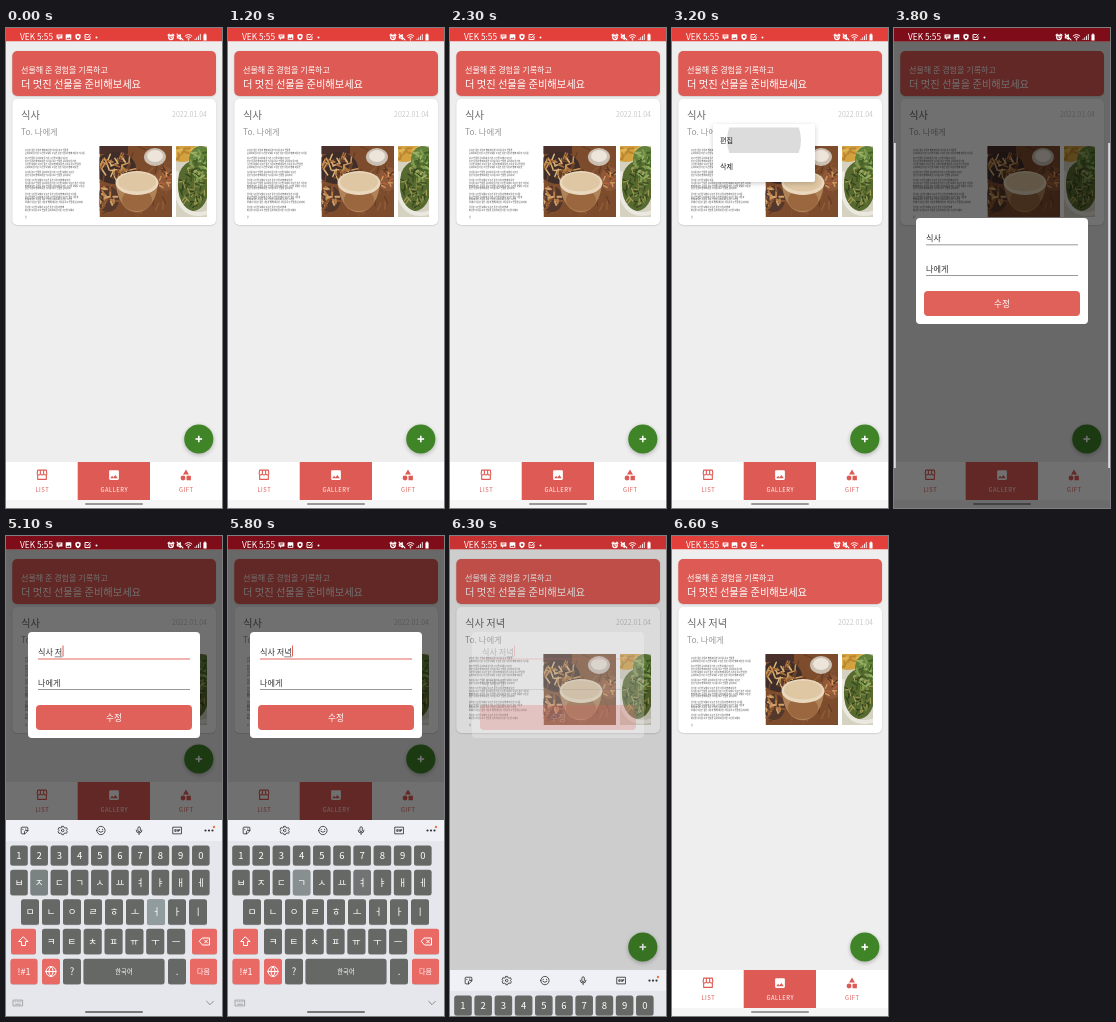
Animation, 216 px wide and 480 px high, one loop 7300 ms. Source, as an HTML page with a canvas:

```html
<!DOCTYPE html>
<html lang="ko">
<head>
<meta charset="utf-8">
<style>
  html, body { margin: 0; width: 100%; height: 100%; overflow: hidden; background: #eee; }
  canvas { display: block; width: 100vw; height: 100vh; }
</style>
</head>
<body>
<canvas></canvas>
<script>
const W = 216, H = 480, LOOP = 7300, STEP = 100;
const RED = '#de5b55', KEY = '#656865', KEY_RED = '#e96964';
const FONT = '"Noto Sans CJK KR", "Noto Sans CJK", "Noto Sans", sans-serif';
const canvas = document.querySelector('canvas');
const ctx = canvas.getContext('2d');

// ---- helpers ----
const ramp = (t, a, b) => Math.min(1, Math.max(0, (t - a) / (b - a)));

function box(x, y, w, h, r, color, shadow = 0) {
  ctx.save();
  if (shadow) {
    ctx.shadowColor = 'rgba(0,0,0,.2)';
    ctx.shadowBlur = shadow * scale;
    ctx.shadowOffsetY = shadow * scale * .3;
  }
  ctx.fillStyle = color;
  ctx.beginPath();
  ctx.roundRect(x, y, w, h, r);
  ctx.fill();
  ctx.restore();
}

function oval(x, y, rx, ry, color) {
  ctx.fillStyle = color;
  ctx.beginPath();
  ctx.ellipse(x, y, rx, ry, 0, 0, 7);
  ctx.fill();
}

function text(str, x, y, size, color, { align = 'left', weight = 400, spacing = 0 } = {}) {
  ctx.font = `${weight} ${size}px ${FONT}`;
  ctx.letterSpacing = spacing + 'px';
  ctx.textAlign = align;
  ctx.fillStyle = color;
  ctx.fillText(str, x, y);
  ctx.letterSpacing = '0px';
}

// Icons live on a 24-unit grid; a line width draws them as outlines.
function icon(path, x, y, size, color, line = 0) {
  ctx.save();
  ctx.translate(x - size / 2, y - size / 2);
  ctx.scale(size / 24, size / 24);
  ctx.fillStyle = ctx.strokeStyle = color;
  ctx.lineWidth = line;
  ctx.lineJoin = ctx.lineCap = 'round';
  const shape = new Path2D(path);
  line ? ctx.stroke(shape) : ctx.fill(shape, 'evenodd');
  ctx.restore();
}

const circle = (x, y, r) => `M${x - r} ${y}a${r} ${r} 0 1 0 ${2 * r} 0a${r} ${r} 0 1 0 ${-2 * r} 0z`;

const ICON = {
  store: 'M4 3h16l1 7q-3 4-6 0q-3 4-6 0q-3 4-6 0zM4 12v8h16v-8M9 3v7M15 3v7',
  image: 'M21 19V5a2 2 0 0 0-2-2H5a2 2 0 0 0-2 2v14a2 2 0 0 0 2 2h14a2 2 0 0 0 2-2zM8.5 13.5l2.5 3 3.5-4.5 4.5 6H5z',
  category: 'M12 2l5.5 9h-11zM13 13.5h8v8h-8z' + circle(6.5, 17.5, 4.5),
  chat: 'M2 3h20v14H12l-5 5v-5H2zM6 7v2h12V7zM6 11v2h9v-2z',
  shield: 'M12 1l9 3v8c0 6-5 9-9 11c-4-2-9-5-9-11V4z' + circle(12, 11, 4),
  check: 'M20 11v9H4V4h11M8 11l4 4 9-11',
  alarm: circle(12, 13, 8) + 'M12 8v5l3 2M2 6l4-4M22 6l-4-4',
  mute: 'M3 9h4l6-5v16l-6-5H3zM2 2l20 20',
  wifi: 'M2 9q10-9 20 0M6 13q6-5 12 0M10 17q2-2 4 0M12 20v1',
  signal: 'M2 22v-4h3v4zM8 22v-9h3v9zM14 22V8h3v14zM20 22V2h3v20z',
  battery: 'M7 4h3V1h4v3h3v19H7z',
  sticker: 'M20 12V6a2 2 0 0 0-2-2H6a2 2 0 0 0-2 2v12a2 2 0 0 0 2 2h6zM12 20v-6l2-2h6M8 9v1M15 8v1',
  gear: circle(12, 12, 3) + 'M10 2h4l1 3 3 1 3-1 2 4-2 3 2 3-2 4-3-1-3 1-1 3h-4l-1-3-3-1-3 1-2-4 2-3-2-3 2-4 3 1 3-1z',
  smile: circle(12, 12, 10) + 'M8 9v1M16 9v1M7 14q5 5 10 0',
  mic: 'M9 6a3 3 0 0 1 6 0v6a3 3 0 0 1-6 0zM5 11a7 7 0 0 0 14 0M12 18v4',
  gif: 'M2 4h20v16H2zM9 10H6v4h3v-2M12 10v4M18 10h-3v4M15 12h2',
  shift: 'M12 3l9 9h-5v8H8v-8H3z',
  erase: 'M8 5h14v14H8l-6-7zM12 9l6 6M18 9l-6 6',
  globe: circle(12, 12, 10) + 'M2 12h20M12 2q-9 10 0 20M12 2q9 10 0 20',
  board: 'M1 5h22v14H1zM5 9h1M10 9h1M14 9h1M18 9h1M6 15h12',
  down: 'M4 8l8 8 8-8'
};

let seed;
const rand = () => (seed = (seed * 16807) % 2147483647) / 2147483647;

function strokes(count, x, y, rx, ry, length, width, colors) {
  ctx.lineWidth = width;
  ctx.lineCap = 'round';
  for (let i = 0; i < count; i++) {
    const a = rand() * 6.28, d = Math.sqrt(rand()), turn = rand() * 6.28;
    const px = x + rx * d * Math.cos(a), py = y + ry * d * Math.sin(a);
    ctx.strokeStyle = colors[i % colors.length];
    ctx.beginPath();
    ctx.moveTo(px, py);
    ctx.lineTo(px + length * Math.cos(turn), py + length * Math.sin(turn));
    ctx.stroke();
  }
}

function clipped(x, y, w, h, draw) {
  ctx.save();
  ctx.beginPath();
  ctx.rect(x, y, w, h);
  ctx.clip();
  draw();
  ctx.restore();
}

// ---- main screen ----
function letter() {
  const words = '오늘은 좋은 사람과 함께 따뜻한 식사를 하고 선물을 준비하며 즐거운 시간을 보냈다'.split(' ');
  let y = 122.8, word = 0;
  [[43, 56], [43, 48, 55, 50], [49, 46], [47, 62, 60, 44], [51, 50, 44, 53], [40, 50]].forEach(group => {
    for (const width of group) {
      let line = '';
      ctx.font = `500 2.1px ${FONT}`;
      while (ctx.measureText(line).width < width - 2) line += words[word++ % words.length] + ' ';
      text(line.trim(), 19, y, 2.1, '#333', { weight: 500 });
      y += 2.9;
    }
    y += 2.25;
  });
  text('끝', 19, 190, 2.1, '#555');
}

function dinnerPhoto() {
  seed = 71;
  box(93.5, 118, 72.5, 71, 0, '#7d4c2d');
  strokes(50, 130, 153, 40, 38, 8, 1.2, ['#94603a', '#643b25', '#85532f']);
  box(93, 118, 29, 8, 0, '#4a302a');
  oval(109, 140, 21, 16, '#3f2d29');
  strokes(50, 108, 139, 17, 11, 6, 1.5, ['#c99456', '#a96d37', '#ddb57a', '#6e4429']);
  oval(102, 171, 11, 13, '#54382b');
  strokes(22, 101, 171, 9, 11, 4, 2, ['#b97d47', '#8a5632', '#d2a26a']);
  oval(149, 129, 11, 9, '#cbbfb2');
  oval(149, 128, 8, 6, '#ede5da');
  oval(160, 151, 10, 12, '#8d5938');
  strokes(18, 159, 150, 8, 10, 4, 1.5, ['#cd955b', '#5b3722', '#b0623a']);
  // Glass seen from above: amber body under pale foam.
  ctx.fillStyle = '#b08258';
  ctx.beginPath();
  ctx.moveTo(110, 155);
  ctx.bezierCurveTo(112, 194, 149, 194, 152, 155);
  ctx.fill();
  oval(131, 172, 15, 11, '#9a673f');
  oval(131, 155, 21.5, 12, '#e9d8be');
  oval(131, 154, 19, 9.5, '#dfc7a3');
}

function saladPhoto() {
  seed = 29;
  box(170, 118, 31, 71, 0, '#d5d2c2');
  oval(176, 122, 15, 12, '#d3a23f');
  strokes(14, 176, 122, 10, 8, 5, 2, ['#e0b656', '#b98532']);
  oval(195, 132, 12, 14, '#62813a');
  oval(187, 158, 16, 25, '#56692f');
  strokes(36, 192, 137, 9, 16, 5, 2, ['#43602a', '#7f9c4f', '#98ae62']);
  strokes(60, 187, 160, 12, 20, 5, 1.2, ['#38491f', '#7d8542', '#2f3f1c', '#a39a55']);
  ctx.strokeStyle = '#ebe9df';
  ctx.lineWidth = 4;
  ctx.beginPath();
  ctx.moveTo(171, 145);
  ctx.bezierCurveTo(166, 175, 180, 192, 203, 184);
  ctx.stroke();
}

function fab(y) {
  ctx.save();
  ctx.shadowColor = 'rgba(0,0,0,.25)';
  ctx.shadowBlur = 4 * scale;
  ctx.shadowOffsetY = 1.5 * scale;
  oval(192.8, y, 14.6, 14.6, '#408428');
  ctx.restore();
  box(189.5, y - .8, 6.6, 1.6, 0, '#fff');
  box(192, y - 3.3, 1.6, 6.6, 0, '#fff');
}

function tabs(y) {
  box(0, y, W, 38, 0, '#fff');
  box(71.7, y, 72.3, 38, 0, RED);
  icon(ICON.store, 36, y + 13, 13, RED, 2);
  icon(ICON.image, 108, y + 13, 13, '#fff');
  icon(ICON.category, 180, y + 13, 13, RED);
  ['LIST', 'GALLERY', 'GIFT'].forEach((label, i) =>
    text(label, 36.3 + 72 * i, y + 30, 5.8, i === 1 ? '#fff' : RED, { align: 'center', spacing: .5 }));
}

function gallery(title, bottom) {
  box(0, 0, W, H, 0, '#eee');
  box(6.3, 23, 203.7, 45, 5, RED, 1.5);
  text('선물해 준 경험을 기록하고', 15, 44.7, 8.05, '#fff');
  text('더 멋진 선물을 준비해보세요', 15, 60, 10.25, '#fff');
  box(6.3, 71, 203.7, 126, 5, '#fff', 1.5);
  text(title, 15, 90.7, 10.3, '#666');
  text('2022.01.04', 201, 89, 7, '#c8c8c8', { align: 'right' });
  text('To. 나에게', 15, 107, 8.4, '#999');
  letter();
  clipped(93.5, 118, 72.5, 71, dinnerPhoto);
  clipped(170, 118, 31, 71, saladPhoto);
  fab(bottom - 61);
  tabs(bottom - 38);
  box(0, bottom, W, H - bottom, 0, '#f5f5f5');
  box(79, 475, 58, 2, 1, '#999');
}

function statusBar(dim) {
  box(0, 0, W, 13.3, 0, '#e33f3b');
  ctx.globalAlpha = dim;
  box(0, 0, W, 13.3, 0, '#7e0c19');
  ctx.globalAlpha = 1;
  text('VEK 5:55', 14, 12.2, 8.3, '#fff');
  icon(ICON.chat, 53.5, 9, 7, '#fff');
  icon(ICON.image, 62.5, 9, 7.5, '#fff');
  icon(ICON.shield, 72, 9, 7, '#fff');
  icon(ICON.check, 81.5, 9, 7.5, '#fff', 3);
  oval(90.5, 9.5, 1, 1, '#fff');
  icon(ICON.alarm, 165, 9, 7, '#fff', 4);
  icon(ICON.mute, 174, 9, 7, '#fff', 4);
  icon(ICON.wifi, 182.5, 9, 8, '#fff', 3);
  icon(ICON.signal, 191.5, 9, 7, '#fff');
  icon(ICON.battery, 199, 9, 7.5, '#fff');
}

// ---- overlays ----
function popup(t) {
  ctx.globalAlpha = ramp(t, 2700, 3000) * (1 - ramp(t, 3300, 3500));
  box(41, 96, 102, 58, 2, '#fff', 5);
  const radius = 37 * ramp(t, 3000, 3200);
  if (radius) clipped(41, 99.5, 102, 25.5, () => oval(92, 112, radius, radius, '#dcdcdc'));
  text('편집', 48, 115, 7.1, '#222');
  text('삭제', 48, 141, 7.1, '#222');
  ctx.globalAlpha = 1;
}

function dialog(y, value, focused, composing, handle) {
  box(22, y, 172, 106, 4, '#fff');
  text(value, 32, y + 22.7, 8.15, '#333');
  const end = 32 + ctx.measureText(value).width;
  box(32, y + 26.5, 152, focused ? 1 : .7, 0, focused ? '#e2685f' : '#777');
  if (composing) box(end - 7.5, y + 24.6, 7.5, .6, 0, '#333');
  if (focused) box(end + .3, y + 13.5, 1, 11, 0, RED);
  if (handle) {
    oval(end, y + 33, 5, 5, '#e2685f');
    ctx.beginPath();
    ctx.moveTo(end, y + 26.5);
    ctx.lineTo(end - 4, y + 30.5);
    ctx.lineTo(end + 4, y + 30.5);
    ctx.fill();
  }
  text('나에게', 32, y + 53.7, 8.15, '#333');
  box(32, y + 57, 152, .7, 0, '#777');
  box(30, y + 73, 156, 25, 4, '#e0605a');
  text('수정', 108, y + 88.6, 8.6, '#fff', { align: 'center', weight: 500 });
}

function keyboard(top, glow) {
  ctx.save();
  ctx.translate(0, top);
  box(0, 0, W, H, 0, '#e5e7ed');
  box(0, 0, W, 21, 0, '#eff1f6');
  ['sticker', 'gear', 'smile', 'mic', 'gif'].forEach((name, i) =>
    icon(ICON[name], 18.5 + 38.2 * i, 10.5, 10, '#333', 2));
  for (const x of [199.5, 203, 206.5]) oval(x, 10.5, 1.1, 1.1, '#333');
  oval(208, 7, 1.2, 1.2, '#e87842');

  const key = (label, x, y, w, h = 25.5, color = KEY, size = 9.5) => {
    box(x - w / 2, y - h / 2 + .6, w, h, 2.5, '#b8babd');
    box(x - w / 2, y - h / 2, w, h, 2.5, color);
    const light = glow(label);
    if (light) box(x - w / 2, y - h / 2, w, h, 2.5, `rgba(190,208,218,${light})`);
    if (ICON[label]) icon(ICON[label], x, y, 12, '#fff', 2);
    else text(label, x, y + size * .36, size, '#fff', { align: 'center' });
  };
  const row = (labels, x, step, y, w, h) =>
    [...labels].forEach((label, i) => key(label, x + step * i, y, w, h));

  row('1234567890', 13, 20.2, 35.5, 17.5, 20);
  row('ㅂㅈㄷㄱㅅㅛㅕㅑㅐㅔ', 13, 20.2, 62.5, 17.5);
  row('ㅁㄴㅇㄹㅎㅗㅓㅏㅣ', 24, 21, 92, 18);
  key('shift', 17.5, 121.5, 25, 25.5, KEY_RED);
  row('ㅋㅌㅊㅍㅠㅜㅡ', 45, 20.85, 121.5, 18);
  key('erase', 198.5, 121.5, 25, 25.5, KEY_RED);
  key('!#1', 18, 151.5, 27, 25.5, KEY_RED, 9);
  key('globe', 45, 151.5, 18, 25.5, KEY_RED);
  key('?', 66, 151.5, 18);
  key('한국어', 118, 151.5, 81, 25.5, KEY, 6.3);
  key('.', 171, 151.5, 18);
  key('다음', 197.5, 151.5, 27, 25.5, KEY_RED, 7);
  icon(ICON.board, 12, 183, 10, '#999', 2);
  icon(ICON.down, 204, 183, 10, '#777', 2);
  box(79, 191, 58, 2, 1, '#777');
  ctx.restore();
}

// Each press: time, key, resulting field value.
const PRESSES = [
  [4700, '한국어', '식사 '], [4900, 'ㅈ', '식사 ㅈ'], [5100, 'ㅓ', '식사 저'],
  [5300, 'ㄴ', '식사 전'], [5500, 'ㅕ', '식사 저녀'], [5700, 'ㄱ', '식사 저녁']
];

function draw(t) {
  const pressed = PRESSES.filter(p => p[0] <= t);
  const value = pressed.length ? pressed.at(-1)[2] : '식사';
  const glow = label => {
    const press = pressed.find(p => p[1] === label);
    return press ? .5 * (1 - ramp(t, press[0], press[0] + 400)) : 0;
  };
  const shown = ramp(t, 3400, 3700) * (1 - ramp(t, 6000, 6400));
  const rise = ramp(t, 4100, 4500), fall = ramp(t, 5950, 6350);
  const resized = t >= 4300 && t < 6200;

  gallery(t >= 6200 ? '식사 저녁' : '식사', resized ? 284 : 472);
  if (t >= 2800 && t < 3500) popup(t);
  if (shown) {
    box(0, 13, W, H, 0, `rgba(0,0,0,${.56 * shown})`);
    ctx.globalAlpha = shown;
    if (t < 4300) {
      box(0, 115, 1.8, 325, 0, '#dcdcdc');
      box(214.2, 115, 1.8, 325, 0, '#dcdcdc');
    }
    dialog(96 + 94 * (1 - rise) ** 1.5, value, t >= 4000, pressed.length > 1, t >= 4100 && t < 4700);
    ctx.globalAlpha = 1;
  }
  if (rise && fall < 1) keyboard(284 + 196 * ((1 - rise) ** 2.4 + fall ** 2), glow);
  statusBar(shown);
}

let scale = 1;
function frame() {
  const w = Math.round(innerWidth * devicePixelRatio), h = Math.round(innerHeight * devicePixelRatio);
  if (canvas.width !== w || canvas.height !== h) {
    canvas.width = w;
    canvas.height = h;
  }
  scale = w / W;
  ctx.setTransform(scale, 0, 0, h / H, 0, 0);
  draw(Math.floor((performance.now() % LOOP) / STEP) * STEP);
  requestAnimationFrame(frame);
}
frame();
</script>
</body>
</html>
```
